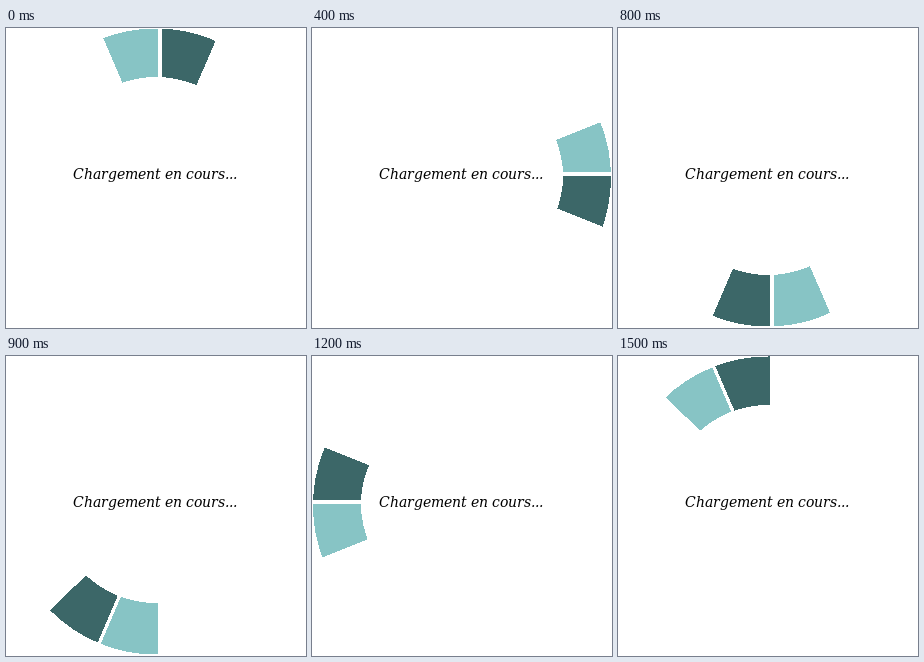
An HTML page for the animation above (1600 ms loop, 300x300 px).

```html
<!DOCTYPE html>
<html lang="fr">
<head>
<meta charset="utf-8">
<style>
  html, body { margin: 0; height: 100%; overflow: hidden; background: #fff; }
  svg { display: block; width: 100vw; height: 100vh; }
  text { font: italic 14px "DejaVu Serif", "Noto Serif", serif; }
  path, circle, ellipse { shape-rendering: crispEdges; }
</style>
</head>
<body>
<svg viewBox="0 0 300 300">
  <path id="trail" fill="#87c4c5"/>
  <path id="head" fill="#3c6768"/>
  <path id="gaps" stroke="#fff" stroke-width="3.3"/>
  <!-- White covers leave only a ring of the wedges visible -->
  <circle cx="150" cy="149.5" r="189" fill="none" stroke="#fff" stroke-width="80"/>
  <ellipse cx="150" cy="148" rx="101" ry="99" fill="#fff"/>
  <text id="label" y="151">Chargement en cours...</text>
</svg>
<script>
const STEP = 100, COUNT = 16;
const HUB = { x: 154, y: 146 };
const REACH = 200, STRETCH = 1.04;
const TEXT_CENTER = 149;
const byId = id => document.getElementById(id);

// Far end of a spoke, counted clockwise from the top
function spoke(i) {
  const angle = i * 2 * Math.PI / COUNT;
  const x = HUB.x + REACH * STRETCH * Math.sin(angle);
  const y = HUB.y - REACH * Math.cos(angle);
  return `${x.toFixed(2)} ${y.toFixed(2)}`;
}

const center = `M${HUB.x} ${HUB.y}L`;
const wedge = i => `${center}${spoke(i)}L${spoke(i + 1)}Z`;

// Place letters on whole pixels
function layOutLabel() {
  const label = byId("label");
  const pen = document.createElement("canvas").getContext("2d");
  pen.font = getComputedStyle(label).font;
  const widths = [...label.textContent].map(c => Math.round(pen.measureText(c).width));
  let x = Math.round(TEXT_CENTER - widths.reduce((a, b) => a + b) / 2);
  label.setAttribute("x", widths.map(w => (x += w) - w).join(" "));
}

function draw() {
  const step = Math.floor(performance.now() / STEP) % COUNT;
  byId("trail").setAttribute("d", wedge(step - 1));
  byId("head").setAttribute("d", wedge(step));
  requestAnimationFrame(draw);
}

byId("gaps").setAttribute("d",
  Array.from({ length: COUNT }, (_, i) => center + spoke(i)).join(""));
layOutLabel();
draw();
</script>
</body>
</html>
```
